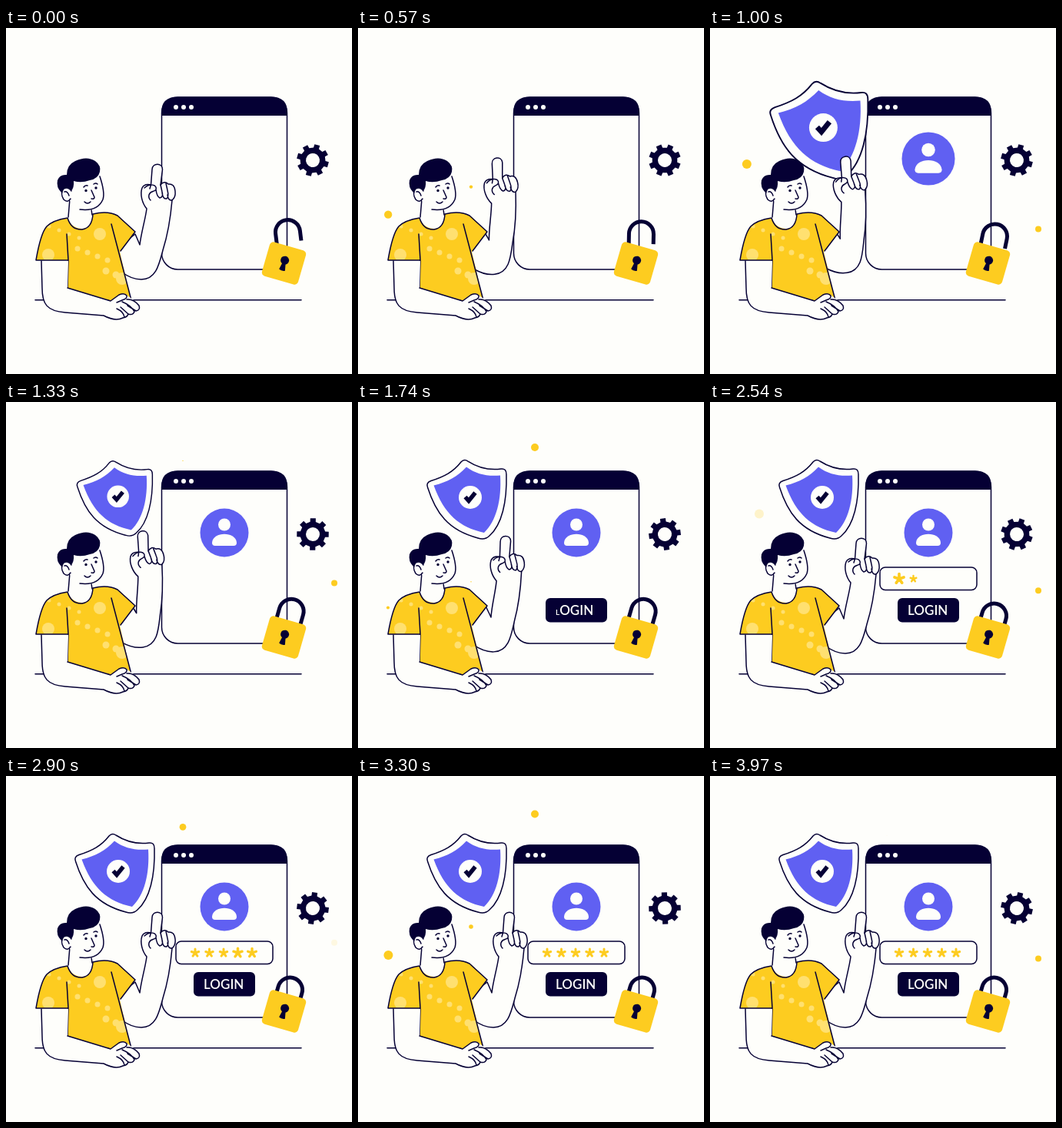
Animation, 450 px wide and 450 px high, one loop 4000 ms. Source, as an HTML page:

```html
<!DOCTYPE html>
<html lang="en">
<head>
<meta charset="utf-8">
<title>Login</title>
<style>
html, body { margin: 0; width: 100%; height: 100%; overflow: hidden; background: #fefefb; }
svg { display: block; width: 100%; height: 100%; }
.line { fill: none; stroke: #050034; stroke-width: 1.5; stroke-linecap: round; stroke-linejoin: round; }
.skin { fill: #fefefb; }
.dark { fill: #050034; }
.yellow { fill: #fdcc20; }
.purple { fill: #6060f2; }
.star { stroke: #fdcc20; stroke-width: 3; stroke-linecap: round; }
text { font: 600 17px Lato, "Open Sans", sans-serif; fill: #fefefb; }
</style>
</head>
<body>
<svg viewBox="0 0 450 450">
  <defs>
    <clipPath id="shirtClip"><use href="#shirt"/></clipPath>
  </defs>

  <path class="line" d="M38 353.800H384"/>

  <!-- Window -->
  <rect class="line skin" x="202.5" y="90" width="163" height="224" rx="21"/>
  <path class="dark" d="M202 114V110Q202 89.500 223 89.500H345Q366 89.500 366 110V114Z"/>
  <g class="skin">
    <circle cx="221" cy="103" r="3"/><circle cx="231" cy="103" r="3"/><circle cx="241" cy="103" r="3"/>
  </g>

  <g id="avatar">
    <circle class="purple" cx="284" cy="170" r="31.500"/>
    <circle class="skin" cx="284" cy="159.500" r="8"/>
    <path class="skin" d="M268 183C269 168 299 168 300 183Q300 187 296 187H272Q268 187 268 183Z"/>
  </g>
  <rect id="field" class="line skin" x="221" y="215" width="126" height="29.500" rx="7"/>
  <g id="stars"></g>
  <rect id="button" class="dark" x="244" y="255" width="80" height="31.500" rx="6"/>
  <text id="label" x="257" y="277"></text>

  <path id="gear" class="dark" fill-rule="evenodd"/>

  <!-- Padlock -->
  <g transform="translate(361.5 306) rotate(16)">
    <path id="shackle" fill="none" stroke="#050034" stroke-width="5" d="M-16-20V-35A16 16 0 0 1 16-35V-22"/>
    <rect class="yellow" x="-24.500" y="-23" width="49" height="46" rx="5"/>
    <circle class="dark" cy="-4" r="5.500"/>
    <path class="dark" d="M-2-1H2L4 9Q0 11-4 9Z"/>
  </g>

  <g id="sparks"></g>

  <g id="shield">
    <path class="line skin" d="M134 78Q138 73.500 143 77C157 86 170 89 186 87Q193 86 193 94C194 130 187 160 171 174Q165 180 156 177C117 167 101 144 90.500 111Q88 105 95 102.500C112 97 124 91 134 78Z"/>
    <path class="purple" d="M141 84.500C154 94 168 97 185 95.500C187 127 180 155 164 170C132 163 112 146 98.500 108.500C117 104 129 97 141 84.500Z"/>
    <circle class="skin" cx="146" cy="124" r="15"/>
    <path fill="none" stroke="#050034" stroke-width="5.500" d="M139.500 123.500L144 128.500L152.500 118"/>
  </g>

  <!-- Raised arm -->
  <g id="arm">
    <path class="line skin" d="M140 290L168 268Q172 277 174 282C176 265 181 250 183 235C177 228 174 216 177 208Q180 202 188.500 204L190 184C190.500 175 203.500 175 203.500 184L201 204Q206 198 211 203Q219 202 220 212Q221 220 216 224C214 247 210 270 204 289C199 308 195 327 176 327Q163 327 150 317Z"/>
    <path class="line" d="M188.500 204L187 209M180 208C187 201 197 204 195 210C193 214 188 211 186 217Q185 221 188 224M195 210Q196 219 200 221Q205 220 203 213L201 204M203 214Q204 223 209 222Q212 219 210 211L208 202M210 217Q211 225 216 224"/>
  </g>

  <!-- Torso -->
  <path class="skin" d="M82 218V249Q98 268 112 243V232Z"/>
  <path id="shirt" class="yellow" d="M80 247Q61 250 53 258Q45 267 39 302L81 302L80 338L138 355H163L148 291L168 265L147 245Q132 237 113 242Q111 262 98 261Q85 260 80 247Z"/>
  <g id="dots" fill="#ffe070" clip-path="url(#shirtClip)"></g>
  <path class="line" d="M80 247Q61 250 53 258Q45 267 39 302L81 302M113 242Q132 237 145 244L168 265L149 290M79 268L81 302L80 338M137 255L163 354M80 247Q85 263 99 262Q112 260 113 242"/>

  <!-- Resting arm -->
  <path class="skin" d="M46 303H81L80 338L136 355L149 346Q155 344 159 349Q166 353 173 361Q175 366 169 368Q165 374 159 374Q153 380 142 378L127 374L77 370C53 368 47 359 47 338Z"/>
  <path class="line" d="M46 303L47 338C47 359 53 368 77 370L127 374Q142 382 152 377Q158 376 159 372M80 338L136 355L147 347Q154 344 157 348Q158 352 151 354L144 357M157 353Q166 352 173 361Q175 367 169 368L158 361M151 356Q163 361 167 369Q165 374 159 372L149 363M144 365Q153 369 154 376"/>

  <!-- Head -->
  <path class="line skin" d="M83 222L81 246M111 236L112 243"/>
  <path class="skin" d="M82 200L121 190Q130 214 126 223Q119 239 101 237Q86 234 82 222Z"/>
  <path class="line" d="M122 193Q129 214 126 223Q119 239 96 236"/>
  <path class="dark" d="M72 214Q65 207 67 198Q70 190 79 191Q79 178 90 173Q105 166 116 173Q124 179 122 187Q120 196 109 198Q98 202 88 199Q89 208 84 213Z"/>
  <path class="line skin" d="M85 212Q81 206 75 209Q70 215 75 223Q80 228 84 222"/>
  <path class="line" d="M76 213Q80 212 82 218M101 207Q103 204 106 205M114 203Q117 201 119 203M111 211L115 220Q115 223 111 222M102 226Q106 230 110 226"/>
  <circle class="dark" cx="104" cy="211.500" r="1.700"/><circle class="dark" cx="117" cy="208" r="1.700"/>
</svg>
<script>
const LOOP = 4000, CYCLE = LOOP / 3, SPARK_LIFE = 950;
const $ = id => document.getElementById(id);

function set(el, attrs) {
  for (const name in attrs) el.setAttribute(name, attrs[name]);
}

function add(parent, tag, attrs = {}) {
  const el = document.createElementNS('http://www.w3.org/2000/svg', tag);
  set(el, attrs);
  return parent.appendChild(el);
}

const progress = (t, start, length) => Math.min(1, Math.max(0, (t - start) / length));
const ramp = (t, start, length) => (1 - Math.cos(Math.PI * progress(t, start, length))) / 2;

// Grows from 0 to 1, going past 1 on the way
function pop(t, start, length, overshoot = 1.7) {
  const q = progress(t, start, length) - 1;
  return 1 + (overshoot + 1) * q ** 3 + overshoot * q ** 2;
}

// Grows from 0 to 1 with a damped swing
function spring(t, start, period) {
  const turns = Math.max(0, t - start) / period;
  return 1 - Math.exp(-3 * turns) * Math.cos(2 * Math.PI * turns);
}

const move = (el, transform) => set(el, { transform });
const scaleAt = (el, x, y, s) => move(el, `translate(${x} ${y}) scale(${s}) translate(${-x} ${-y})`);
const polar = (r, angle) => `${r * Math.cos(angle)} ${r * Math.sin(angle)}`;
const steps = (count, make) => Array.from({ length: count }, (_, i) => make(i));

// Gear: eight teeth around a round hole
const teeth = steps(8, i => {
  const a = i * Math.PI / 4;
  return [polar(16.5, a - .22), polar(21, a - .17), polar(21, a + .17), polar(16.5, a + .22)].join('L');
});
set($('gear'), { d: `M${teeth.join('L')}ZM9 0A9 9 0 1 0-9 0A9 9 0 1 0 9 0Z` });

// Shirt pattern: three large spots among scattered small ones
for (const [cx, cy] of [[122, 268], [151, 326], [55, 295]]) add($('dots'), 'circle', { cx, cy, r: 8 });
for (let i = 0; i < 12; i++) {
  add($('dots'), 'circle', { cx: 56 + i * 37 % 98, cy: 258 + i * 29 % 82, r: 2.5 + i % 3 });
}

const letters = [...'LOGIN'].map(c => {
  const el = add($('label'), 'tspan');
  el.textContent = c;
  return el;
});

const rays = steps(5, i => `M0 0L${polar(5, (i * .4 - .5) * Math.PI)}`).join('');
const stars = steps(5, () => add($('stars'), 'path', { class: 'star', d: rays }));

// Each cycle releases these sparks; they grow, rise and fade
const kinds = [
  { start: 300, x: 39, y: 284, rise: 145, size: 6, drift: 30 },
  { start: 340, x: 147, y: 245, rise: 158, size: 3, drift: 0 },
  { start: 1290, x: 230, y: 78, rise: 40, size: 5, drift: 0 },
  { start: 640, x: 427, y: 290, rise: 75, size: 4, drift: 0 }
];
const sparks = steps(3, round => kinds.map(kind => ({
  ...kind, start: kind.start + round * CYCLE, el: add($('sparks'), 'circle', { class: 'yellow' })
}))).flat();

function draw(t) {
  const lift = ramp(t, 0, 830) - ramp(t, 1187, 830);
  move($('arm'), `rotate(${-9 * lift} 122 308)`);
  move($('gear'), `translate(399 172) rotate(${16 + t / LOOP * 360})`);

  const turn = 23 * (ramp(t, 0, 1400) - 1);
  const drop = 6 * ramp(t, 1750, 400);
  move($('shackle'), `translate(0 ${drop}) rotate(${turn} -16 -22)`);

  scaleAt($('shield'), 140, 100, spring(t, 800, 530));
  scaleAt($('avatar'), 284, 170, pop(t, 750, 400));
  scaleAt($('button'), 284, 271, pop(t, 1350, 350));
  scaleAt($('field'), 284, 230, pop(t, 2000, 350));

  letters.forEach((el, i) => { el.style.fontSize = `${17 * pop(t, 1710 + i * 75, 200)}px`; });
  stars.forEach((el, i) =>
    move(el, `translate(${246 + i * 18.5} 230) scale(${pop(t, 2390 + i * 110, 250, 3.4)})`));

  for (const { start, x, y, rise, size, drift, el } of sparks) {
    const p = progress(t, start, SPARK_LIFE);
    set(el, {
      cx: x + drift * p ** 4,
      cy: y - rise * p,
      r: size * Math.min(1, p * 3),
      opacity: Math.min(1, (1 - p) * 5)
    });
  }
}

const begin = performance.now();
function tick() {
  draw((performance.now() - begin) % LOOP);
  requestAnimationFrame(tick);
}
tick();
</script>
</body>
</html>
```
